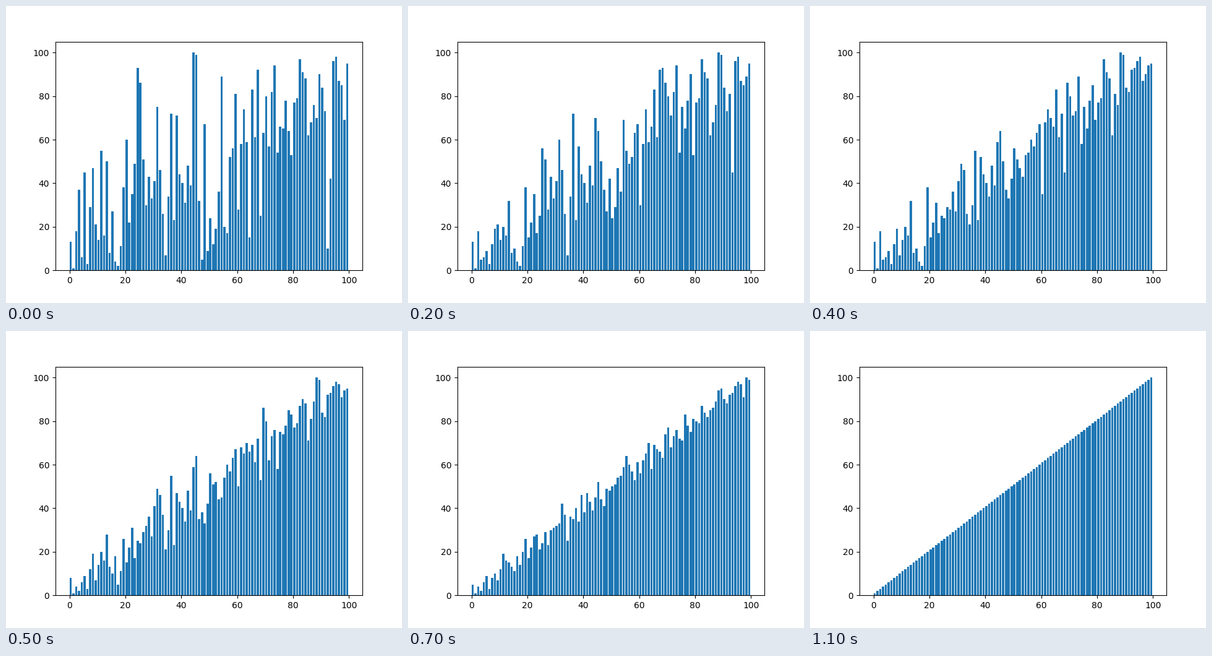
A matplotlib script that plays this animation: 640x480 px, repeating every 1.3 s.

```python
import matplotlib.pyplot as plt
from matplotlib.animation import FuncAnimation

FRAMES = 13
START_GAP = 44
SHRINK = 1.3

VALUES = [
    13, 1, 18, 37, 6, 45, 3, 29, 47, 21,
    14, 55, 16, 50, 8, 27, 4, 2, 11, 38,
    60, 22, 35, 49, 93, 86, 51, 30, 43, 33,
    41, 75, 46, 26, 7, 34, 72, 23, 71, 44,
    40, 31, 48, 39, 100, 99, 32, 5, 67, 9,
    24, 12, 19, 36, 89, 20, 17, 52, 56, 81,
    28, 58, 74, 59, 15, 83, 61, 92, 25, 63,
    80, 57, 82, 94, 54, 66, 65, 78, 64, 53,
    77, 79, 97, 91, 88, 62, 68, 76, 70, 90,
    84, 73, 10, 42, 96, 98, 87, 85, 69, 95,
]


def comb_pass(values, gap):
    """Return the values after one comb sort pass."""
    out = list(values)
    for i in range(len(out) - gap):
        if out[i] > out[i + gap]:
            out[i], out[i + gap] = out[i + gap], out[i]
    return out


def comb_states(values, gap, count):
    states = [values]
    while len(states) < count:
        states.append(comb_pass(states[-1], gap))
        gap = max(1, int(gap / SHRINK))
    return states


states = comb_states(VALUES, START_GAP, FRAMES)

fig, ax = plt.subplots(figsize=(6.4, 4.8), dpi=100)
bars = ax.bar(range(len(VALUES)), VALUES, align="edge")


def update(frame):
    for bar, height in zip(bars, states[frame]):
        bar.set_height(height)
    return bars.patches


anim = FuncAnimation(fig, update, frames=FRAMES, interval=100,
                     repeat=True, repeat_delay=0)
plt.show()
```
